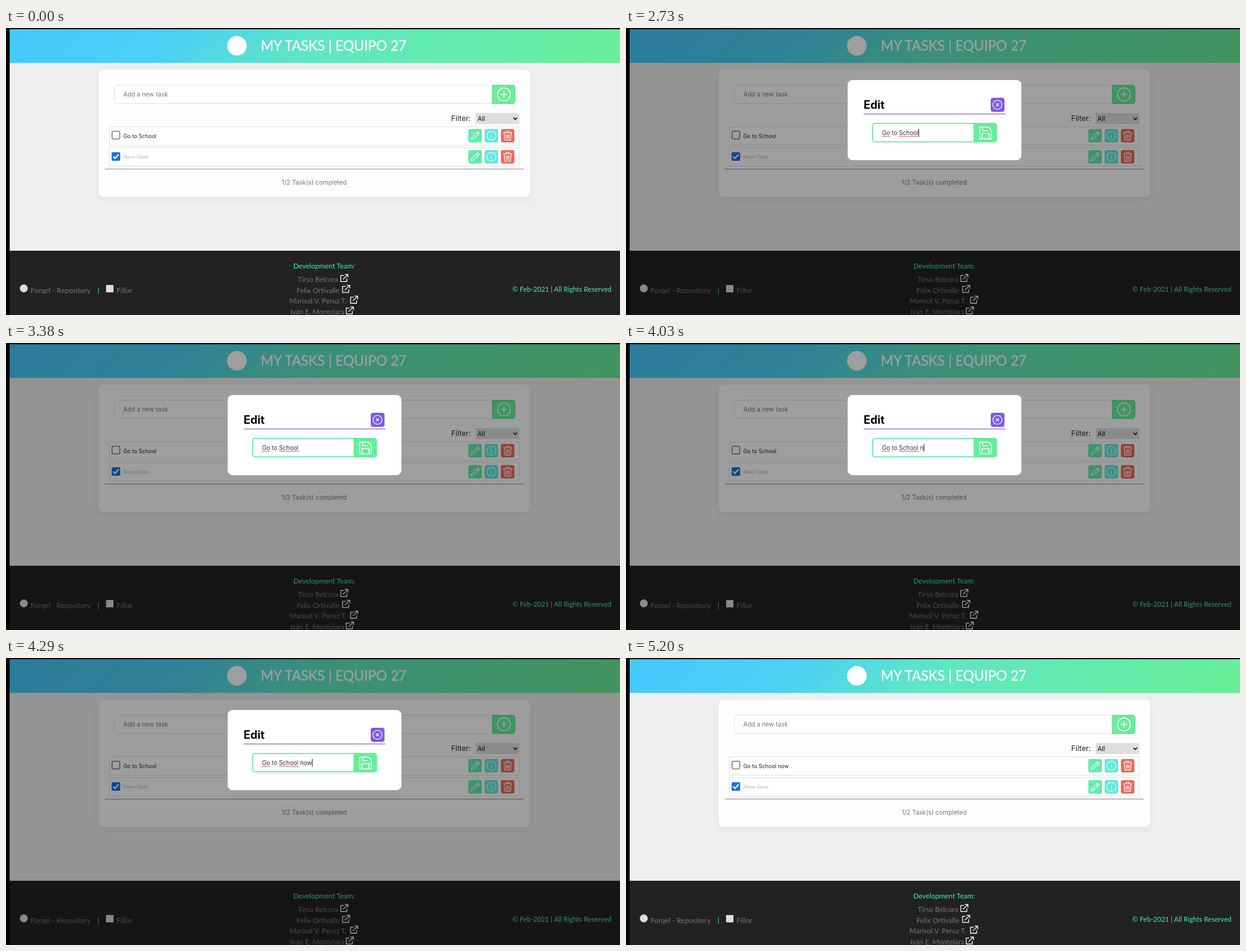
Write an HTML page that moves like this. It is 1000x469 px and loops after 7410 ms.

```html
<!DOCTYPE html>
<html lang="en">
<head>
<meta charset="utf-8">
<title>Task list</title>
<style>
  html, body { margin: 0; width: 100%; height: 100%; overflow: hidden; background: #000; }
  svg { display: block; width: 100%; height: 100%; }
  text { font-family: Inter, "Open Sans", sans-serif; white-space: pre; }
  .foot text, .title { font-family: Lato, Cabin, sans-serif; }
  .foot text { font-size: 11.5px; fill: #777; }
  .foot .teal { fill: #4fe9c0; }
  .mid { text-anchor: middle; }
  .task { font-size: 8.9px; fill: #222; }
  .box { fill: #fff; stroke: #dfe3e6; }
  .icon { fill: none; stroke: #fff; stroke-width: 1.6; stroke-linecap: round; stroke-linejoin: round; }
  .squiggle { stroke: #e0282e; stroke-width: 1.2; stroke-dasharray: 1.6 .9; }
</style>
</head>
<body>
<svg viewBox="0 0 1000 469">
  <defs>
    <linearGradient id="sky" gradientUnits="userSpaceOnUse" x1="6" y1="2" x2="530" y2="526">
      <stop offset="0" stop-color="#46c8fc"/>
      <stop offset=".27" stop-color="#4bd0f5"/>
      <stop offset=".5" stop-color="#5ee7c2"/>
      <stop offset="1" stop-color="#69ef96"/>
    </linearGradient>
    <filter id="soft" x="-5%" y="-10%" width="110%" height="125%">
      <feDropShadow dx="0" dy="4" stdDeviation="6" flood-opacity=".05"/>
    </filter>
    <symbol id="plus" viewBox="0 0 24 24"><circle cx="12" cy="12" r="11"/><path d="M12 7v10M7 12h10"/></symbol>
    <symbol id="cross" viewBox="0 0 24 24"><circle cx="12" cy="12" r="11"/><path d="M9 9l6 6M15 9l-6 6"/></symbol>
    <symbol id="info" viewBox="0 0 24 24"><circle cx="12" cy="12" r="11"/><path d="M12 11v6M12 7.5v.2"/></symbol>
    <symbol id="pen" viewBox="0 0 24 24"><path d="M18 2l4 4L8 20l-6 2 2-6zM15 5l4 4"/></symbol>
    <symbol id="bin" viewBox="0 0 24 24"><path d="M2 5h20M8 5V2h8v3M4 5l1.500 17h13L20 5M9 10v8M12 10v8M15 10v8"/></symbol>
    <symbol id="disk" viewBox="0 0 24 24"><path d="M2 2h15l5 5v15H2zM6 22v-9h12v9M7 2v6h9"/></symbol>
    <symbol id="out" viewBox="0 0 24 24"><path d="M10 5H2v17h17v-8M14 2h8v8M22 2L9 15"/></symbol>
    <g id="tools">
      <rect x="753" y="165" width="22" height="22" rx="3" fill="#62ecae"/>
      <rect x="779.5" y="165" width="22" height="22" rx="3" fill="#62e8dc"/>
      <rect x="806" y="165" width="22" height="22" rx="3" fill="#f0695a"/>
      <g class="icon">
        <use href="#pen" x="756" y="168" width="16" height="16"/>
        <use href="#info" x="782.5" y="168" width="16" height="16"/>
        <use href="#bin" x="808.5" y="167.500" width="17" height="17"/>
      </g>
    </g>
  </defs>

  <rect x="6" y="2" width="994" height="362" fill="#eeefee"/>
  <rect x="6" y="2" width="994" height="55" fill="url(#sky)"/>
  <circle cx="376" cy="29" r="16" fill="#fff"/>
  <text class="title" x="415" y="37" font-size="22.3" fill="#fff" stroke="#fff" stroke-width=".4">MY TASKS | EQUIPO 27</text>

  <rect x="151" y="68" width="702.5" height="208" rx="8" fill="#fdfdfd" filter="url(#soft)"/>
  <rect class="box" x="176.500" y="93.500" width="652" height="30" rx="4"/>
  <text x="191" y="112" font-size="10" fill="#777">Add a new task</text>
  <path d="M792 93.500h33a4 4 0 0 1 4 4v22a4 4 0 0 1 -4 4h-33z" fill="#66ee99" stroke="#58d98f"/>
  <use class="icon" href="#plus" x="799.5" y="97" width="23" height="23"/>
  <text x="725" y="152" font-size="12" fill="#222">Filter:</text>
  <rect x="765" y="139" width="71" height="18" fill="#dedede"/>
  <text x="768" y="152" font-size="10.5" fill="#111">All</text>
  <path d="M826.500 146.500l3 3 3-3" fill="none" stroke="#111" stroke-width="1.6"/>

  <rect class="box" x="168.500" y="161.500" width="667" height="30"/>
  <rect class="box" x="168.500" y="195.500" width="667" height="30"/>
  <rect x="172.700" y="168.700" width="12.600" height="12.600" rx="1.800" fill="#fff" stroke="#666" stroke-width="1.300"/>
  <text class="task" id="task" x="191" y="180"></text>
  <rect x="172" y="203" width="14" height="14" rx="2" fill="#1a73e8"/>
  <path d="M174.500 210l3 3 6-6.500" fill="none" stroke="#fff" stroke-width="2"/>
  <text class="task" x="191" y="214" style="fill:#ccc;text-decoration:line-through">New Task</text>
  <use href="#tools"/>
  <use href="#tools" y="34.500"/>
  <path d="M161 230.500h682" stroke="#8c8c8c"/>
  <text class="mid" x="502" y="256" font-size="10.2" fill="#777">1/2 Task(s) completed</text>

  <g class="foot">
    <rect x="6" y="364" width="994" height="105" fill="#222"/>
    <circle cx="29" cy="425.500" r="6.500" fill="#ddd"/>
    <text x="40" y="433" style="font-size:11.7px">Forqel - Repository</text>
    <text class="teal" x="149" y="433">|</text>
    <rect x="163" y="420" width="12" height="12" fill="#ddd"/>
    <text x="180" y="433" style="font-size:11.7px">Fillor</text>
    <text class="teal mid" x="518" y="393">Development Team:</text>
    <g id="team"></g>
    <text class="teal" x="986" y="431" text-anchor="end" style="font-size:11.1px">© Feb-2021 | All Rights Reserved</text>
  </g>

  <g id="modal">
    <rect x="6" y="2" width="994" height="467" opacity=".38"/>
    <rect x="361" y="85" width="283" height="131" rx="8" fill="#fff"/>
    <text x="387" y="132" font-size="18.2" font-weight="700">Edit</text>
    <rect x="594" y="114" width="22.500" height="23" rx="4" fill="#7f5be0"/>
    <use class="icon" href="#cross" x="597" y="117.500" width="16" height="16"/>
    <path d="M387 140.500h231" stroke="#6f50b8"/>
    <rect class="box" id="field" x="401.500" y="156" width="202" height="30" rx="4"/>
    <path d="M566 155.500h34a4 4 0 0 1 4 4v23a4 4 0 0 1 -4 4h-34z" fill="#66ee99"/>
    <use class="icon" href="#disk" x="574" y="160" width="23" height="23"/>
    <g id="spell"><path class="squiggle" d="M417 177.200h13M445 177.200h32"/></g>
    <text id="entry" x="417" y="175" font-size="9.75" fill="#333"></text>
    <path id="caret" d="M.5 165v12.500" stroke="#111"/>
  </g>
</svg>
<script>
const $ = id => document.getElementById(id);
const LOOP = 7410, OPEN = 1690, FOCUS = 2730, CLOSE = 5200;
const BASE = 'Go to School', ADDED = ' now';
const KEYS = [3640, 4030, 4160, 4290];          // moments each added letter is typed
const BLINKS = [[3380, 3640], [4940, CLOSE]];   // caret hidden

// name, centre of the text, left edge of the link icon
$('team').innerHTML = [
  ['Tirso Belcora', 508, 544],
  ['Felix Ortivalle', 508, 547],
  ['Marisol V. Peruz T.', 508, 560],
  ['Iván E. Montelara', 507, 553]
].map(([name, x, icon], i) => {
  const y = 415 + i * 17.7;
  return `<text class="mid" x="${x}" y="${y}">${name}</text>
    <use class="icon" href="#out" x="${icon}" y="${y - 13.500}" width="14" height="14" style="stroke-width:2.2"/>`;
}).join('');

const show = (id, on) => $(id).setAttribute('visibility', on ? 'visible' : 'hidden');

function draw(t) {
  const open = t >= OPEN && t < CLOSE;
  const focus = open && t >= FOCUS;
  const typed = BASE + ADDED.slice(0, KEYS.filter(k => t >= k).length);

  $('task').textContent = t < CLOSE ? BASE : BASE + ADDED;
  $('entry').textContent = typed;
  $('field').style.stroke = focus ? '#56dfb0' : '';
  $('field').style.strokeWidth = focus ? 1.5 : 1;
  $('caret').setAttribute('transform', `translate(${417 + $('entry').getComputedTextLength()})`);
  show('modal', open);
  show('spell', focus);
  show('caret', focus && !BLINKS.some(([a, b]) => t >= a && t < b));
}

const start = performance.now();
function tick() {
  draw((performance.now() - start) % LOOP);
  requestAnimationFrame(tick);
}
tick();
</script>
</body>
</html>
```
